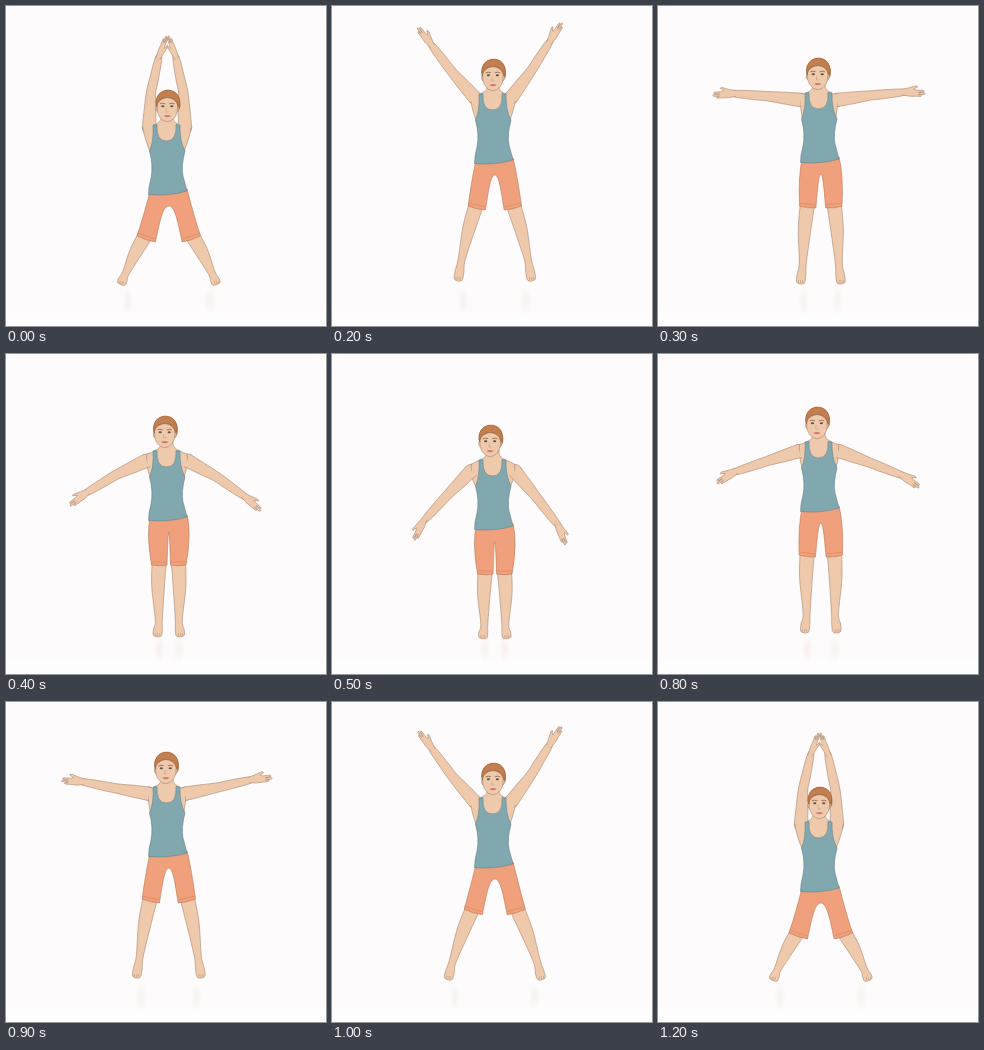
Write an HTML page that moves like this. It is 320x320 px and loops after 1.3 s.

```html
<!DOCTYPE html>
<html lang="en">
<head>
<meta charset="utf-8">
<title>Jumping jack</title>
<style>
  html, body { margin: 0; width: 100%; height: 100%; overflow: hidden; background: #fefbfc; }
  svg { display: block; width: 100%; height: 100%; }
  .skin { fill: #eec9ac; }
  .line { stroke: #a3866f; stroke-width: .6; stroke-linejoin: round; stroke-linecap: round; }
  .open { fill: none; }
  .thin { fill: none; stroke: #b58f76; stroke-width: .5; stroke-linecap: round; }
  .tank { fill: #81a7af; stroke: #64838c; stroke-width: .6; stroke-linejoin: round; }
  .shorts { fill: #f0a07a; stroke: #b47a5c; stroke-width: .6; stroke-linejoin: round; }
  .seam { fill: none; stroke: #dc8961; stroke-width: .7; }
  .hair { fill: #c47d4b; stroke: #8f5b38; stroke-width: .5; }
</style>
</head>
<body>
<svg viewBox="0 0 320 320">
  <defs>
    <radialGradient id="glow">
      <stop offset="0" stop-color="#f3ece8" stop-opacity=".6"/>
      <stop offset="1" stop-color="#f3ece8" stop-opacity="0"/>
    </radialGradient>
  </defs>
  <rect width="320" height="320" fill="#fefbfc"/>
  <rect y="306" width="320" height="14" fill="#fefdfd"/>
  <g id="figure"></g>
</svg>
<script>
const STEP = 100;
const MID = 161;
const LEG_MID = 162.8;
const figure = document.getElementById('figure');

// waist y, upper arm, forearm and hand angles (0 down, 180 up),
// knee and ankle spread, toe y, foot length
const poses = [
  [188, 183, 192, 202, 22.5, 43, 279, 12],
  [168, 164, 168, 172, 20, 40, 278, 20],
  [157, 141, 145, 146, 18, 33, 275, 22],
  [156, 97, 95, 88, 13, 18, 278, 21],
  [166, 63, 57, 52, 9.5, 10, 283, 17],
  [175, 42, 40, 25, 9.5, 10.5, 285, 15],
  [180, 24, 27, 6, 10, 10.5, 285, 14],
  [174, 28, 33, 10, 9.5, 10.5, 285, 16],
  [157, 71, 70, 58, 13.5, 14.2, 279, 20],
  [154, 100, 102, 96, 18, 29, 276, 22],
  [165, 141, 146, 146, 21.5, 42, 278, 19],
  [178, 164, 174, 182, 22, 43, 279, 15],
  [189, 183, 192, 202, 22.5, 43, 279, 12]
];

const rad = deg => deg * Math.PI / 180;
const fmt = n => n.toFixed(2);
const mix = (a, b, k) => a.map((v, i) => v + (b[i] - v) * k);
const path = (cls, d) => `<path class="${cls}" d="${d}"/>`;
const move = ([x, y], deg, len) => [x - Math.sin(rad(deg)) * len, y + Math.cos(rad(deg)) * len];

// Catmull-Rom curve through the points
function curve(points) {
  const at = i => points[Math.max(0, Math.min(points.length - 1, i))];
  let d = 'M' + at(0).map(fmt);
  for (let i = 0; i < points.length - 1; i++) {
    const c1 = at(i).map((v, j) => v + (at(i + 1)[j] - at(i - 1)[j]) / 6);
    const c2 = at(i + 1).map((v, j) => v - (at(i + 2)[j] - at(i)[j]) / 6);
    d += `C${c1.map(fmt)} ${c2.map(fmt)} ${at(i + 1).map(fmt)}`;
  }
  return d;
}

// Tapered shape around a spine, left open at its root
function limb(spine, radii) {
  const near = [], far = [];
  spine.forEach(([x, y], i) => {
    const a = spine[Math.max(0, i - 1)], b = spine[Math.min(spine.length - 1, i + 1)];
    const len = Math.hypot(b[0] - a[0], b[1] - a[1]);
    const nx = (b[1] - a[1]) / len * radii[i], ny = (a[0] - b[0]) / len * radii[i];
    near.push([x + nx, y + ny]);
    far.unshift([x - nx, y - ny]);
  });
  return path('skin line', curve([...near, ...far]));
}

function shoulder(pose) {
  const down = Math.cos(rad(pose[1]));
  return [MID - 18 - 5 * Math.max(0, down), pose[0] - 61.5 + 4.5 * down];
}

function arm(pose, lean) {
  const [, up, fore, palm] = pose;
  const side = Math.max(0, Math.sin(rad(up)));
  const tilt = -lean * Math.sin(rad(2 * up)), reach = 1 - .06 * side;
  const root = shoulder(pose);
  const elbow = move(root, up + tilt, 35 * reach);
  const wrist = move(elbow, fore + tilt, 38 * reach);
  const hand = path('skin line', 'M-3-3.400Q5-5.500 11-4.500L17-4.600Q18.500-3.600 17-2.800L14-2.200L20.500-2.300' +
    'Q22-1.200 20.500-.2L14 .2L20 1Q20.500 2.500 18.500 2.700L11.500 2.800L9 4L13 6.500Q13 8 10.500 7.500Q4 5-3 3.400');
  return limb([root, mix(root, elbow, .5), elbow, mix(elbow, wrist, .4), wrist], [6.8, 5.9, 4.7, 4.4, 2.8]) +
    `<g transform="translate(${wrist.map(fmt)}) rotate(${fmt(palm + tilt + 90)}) scale(${reach} ${fmt(.6 + .25 * side)})">${hand}</g>`;
}

function chest(pose) {
  const y = pose[0], [sx, sy] = shoulder(pose);
  const raised = Math.max(0, -Math.cos(rad(pose[1])));
  const outline = `M155 ${y - 82}L155 ${y - 75}Q154 ${y - 71} 148 ${y - 69}Q${fmt(sx + 4)} ${y - 67} ${fmt(sx)} ${fmt(sy - 6.5)}` +
    `L${fmt(sx - 6 * raised)} ${fmt(sy)}Q${fmt(sx - 5 * raised)} ${fmt(sy + 9)} 145 ${y - 40}`;
  return `<circle class="skin line" cx="${fmt(sx)}" cy="${fmt(sy)}" r="6.600"/>` +
    path('skin', `${outline}L162 ${y - 40}V${y - 82}Z`) + path('open line', outline);
}

function leg([y, , , , knee, ankle, toeY, foot]) {
  const top = [LEG_MID - knee, y + 40], low = [LEG_MID - ankle, toeY - foot];
  const toe = [LEG_MID - ankle * 1.1 - .5, toeY - 1];
  const calf = mix(top, low, .45);
  calf[0] -= 1;
  const toes = [-2, 0, 2].map(dx => `M${fmt(toe[0] + dx)} ${toeY - 3.5}v2`).join('');
  return limb([top, calf, low, mix(low, toe, .6), toe], [7.2, 6.3, 3.5, 4.4, 3.6]) + path('thin', toes);
}

function shortsHalf([y, , , , knee]) {
  const half = 6.7 + knee * .11, skew = (knee - 9) * .22;
  const left = LEG_MID - knee - half, right = LEG_MID - knee + half, gap = LEG_MID - right;
  const hem = rise => [`${fmt(left + rise * .1)} ${fmt(y + 45 - skew - rise)}`, `${fmt(right - rise * .1)} ${fmt(y + 45 + skew - rise)}`];
  const [outer, inner] = hem(0);
  return path('shorts', `M${LEG_MID + .3} ${y - 5}L144.500 ${y - 5}Q140 ${y + 14} ${outer}` +
    `Q${fmt(LEG_MID - knee)} ${fmt(y + 46.5)} ${inner}` +
    `C${fmt(LEG_MID - gap * .6)} ${y + 22} ${fmt(LEG_MID - gap * .4)} ${y + 12} ${LEG_MID + .3} ${y + 12}`) +
    path('seam', 'M' + hem(3).join('L'));
}

const tank = path('tank',
  'M147-69L151-69.500Q150-53 160.500-53Q171-53 170-69.500L174-69Q173.500-53 179-43Q175-28 177-18Q179.500-9 181-3' +
  'Q163 2.500 142.500 .5Q142.500-7 145-16Q147.500-28 143.500-43Q148-53 147-69Z');

const head =
  path('hair', 'M-10.500 1C-13-9-8-16.500 1-16.500C10-16 14-8 12.500 1L9 6H-8Z') +
  path('skin line', 'M-10.300-1Q-12-1-11.200 3Q-10.600 5-9.600 5M10.500-1Q12.300-1 11.300 3Q10.800 5 9.800 5') +
  path('skin line', 'M-10-4C-11 5-9 10-4 13.500Q0 16 4 13.500C9 10 11 5 10-4Q0-15-10-4Z') +
  path('hair', 'M-10.500 0C-13-9-8-17 1-17C10-16.500 14-9 11.500 0Q9.500-3 8.500-6.500Q5-10.500-2-9.500Q-7-9-9-5Q-10-3-10.500 0Z') +
  path('thin', 'M-8-8Q-4-14 4-14M-3-10Q5-13 10-6') +
  '<path fill="none" stroke="#97694c" stroke-width=".9" stroke-linecap="round" d="M-7-3.300Q-5-4.600-2.300-3.300M2.300-3.300Q5-4.600 7-3.300"/>' +
  '<ellipse cx="-4.500" cy="-.8" rx="1.600" ry="1" fill="#5b4d46"/><ellipse cx="4.500" cy="-.8" rx="1.600" ry="1" fill="#5b4d46"/>' +
  path('thin', 'M-.8 1.500L-1.300 4.800Q0 5.800 1.300 4.800') +
  '<path fill="#cf7d6b" d="M-3.700 9Q-1 7.700 0 8.300Q1 7.700 3.700 9Q0 11.500-3.700 9Z"/>';

const mirrored = (mid, part) => part(-2.5) + `<g transform="translate(${mid * 2}) scale(-1 1)">${part(2.5)}</g>`;

function draw(pose) {
  const [y, up, , , , ankle] = pose;
  const shine = () => `<ellipse cx="${fmt(LEG_MID - ankle * .95)}" cy="295" rx="6" ry="16" fill="url(#glow)"/>`;
  const headX = 159.5 - 1.8 * Math.cos(rad(up));
  figure.innerHTML =
    mirrored(LEG_MID, () => shine() + leg(pose)) +
    mirrored(LEG_MID, () => shortsHalf(pose)) +
    mirrored(MID, () => chest(pose)) +
    mirrored(MID, lean => arm(pose, lean)) +
    `<g transform="translate(0 ${y})">${tank}</g>` +
    `<g transform="translate(${fmt(headX)} ${y - 87})">${head}</g>`;
}

let shown = -1;
const start = performance.now();
function tick(now) {
  const index = Math.floor(Math.max(0, now - start) / STEP) % poses.length;
  if (index !== shown) draw(poses[shown = index]);
  requestAnimationFrame(tick);
}
tick(start);
</script>
</body>
</html>
```
